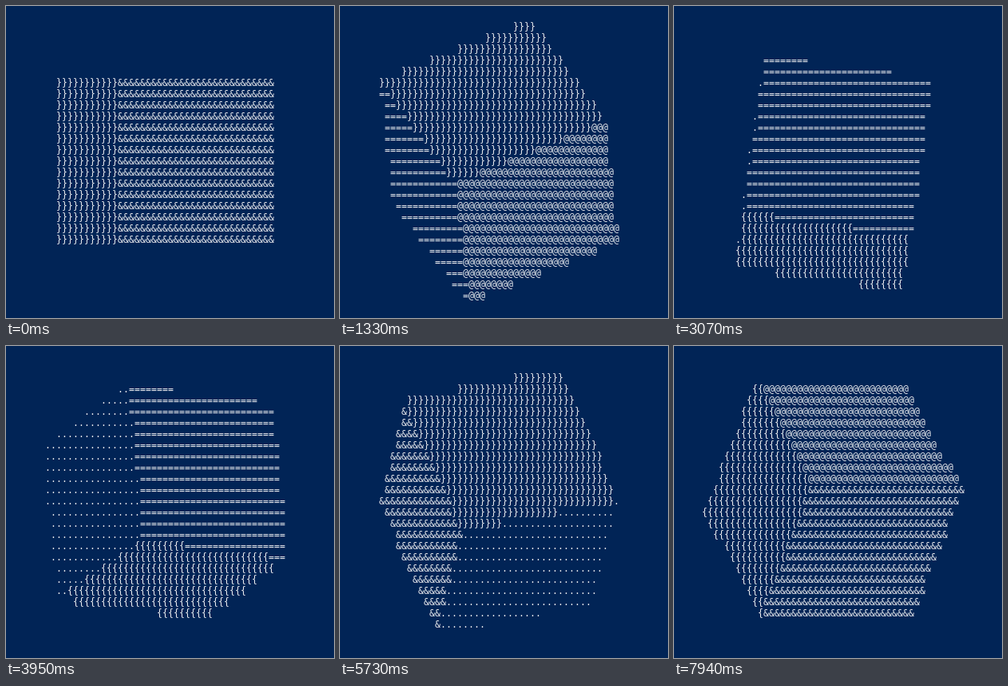
Recreate the animation shown at these times as an HTML page with a canvas. Size 411x390 px, loop 8000 ms.

```html
<!DOCTYPE html>
<html lang="en">
<head>
<meta charset="utf-8">
<title>Text cube</title>
<style>
  html, body { margin: 0; width: 100%; height: 100%; overflow: hidden; background: #012456; }
  canvas { display: block; }
</style>
</head>
<body>
<canvas id="stage" width="411" height="390"></canvas>
<script>
const LOOP = 8000, COLS = 57, ROWS = 27, CELL_W = 7, CELL_H = 14, TOP = 6;
const CENTER_X = 199.5, CENTER_Y = 195, HALF = 106;
const GLYPHS = ['}{', '&=', '@.'];   // front and back face of each cube axis

// Bursts of steps: first change, last change, number of changes.
const BURSTS = [
  [100, 840, 17], [940, 1670, 17], [1770, 2570, 13], [2670, 3470, 9], [3570, 4360, 16],
  [4380, 5120, 14], [5220, 6010, 15], [6030, 6830, 17], [6930, 7700, 15], [7800, 7940, 4]
];
const SHORT = 20;

// Orientations passed on the way: time, then the screen x and y parts of the cube axes.
const KEYS = [
  [0, [-.93, .367, 0], [0, 0, 1]],
  [820, [-.438, .884, .175], [-.363, -.363, .846]],
  [2190, [.219, .39, .893], [-.974, .065, .2]],
  [3070, [.124, -.06, .99], [-.938, .32, .145]],
  [4760, [-.205, -.955, .214], [-.968, .16, -.21]],
  [6530, [.722, -.545, -.43], [-.09, .55, -.825]],
  [7940, [.895, .338, .305], [.035, .6, -.795]]
];

const dot = (a, b) => a[0] * b[0] + a[1] * b[1] + a[2] * b[2];
const scale = (a, s) => a.map(v => v * s);
const unit = a => scale(a, 1 / Math.hypot(...a));
const cross = (a, b) => [a[1] * b[2] - a[2] * b[1], a[2] * b[0] - a[0] * b[2], a[0] * b[1] - a[1] * b[0]];
const transpose = m => m[0].map((_, c) => m.map(row => row[c]));
const multiply = (a, b) => a.map(row => transpose(b).map(col => dot(row, col)));

function orientation(x, y) {
  x = unit(x);
  y = unit(y.map((v, i) => v - dot(x, y) * x[i]));
  return [x, y, cross(x, y)];
}

// Rotation matrix of a rotation vector, and back.
function rotation(vector) {
  const angle = Math.hypot(...vector);
  if (angle < 1e-9) return [[1, 0, 0], [0, 1, 0], [0, 0, 1]];
  const axis = scale(vector, 1 / angle), c = Math.cos(angle), s = Math.sin(angle);
  return transpose([[1, 0, 0], [0, 1, 0], [0, 0, 1]].map(e => {
    const side = cross(axis, e), along = dot(axis, e) * (1 - c);
    return e.map((v, i) => v * c + side[i] * s + axis[i] * along);
  }));
}
function rotationVector(m) {
  const v = [m[2][1] - m[1][2], m[0][2] - m[2][0], m[1][0] - m[0][1]];
  const length = Math.hypot(...v);
  return length < 1e-9 ? [0, 0, 0]
    : scale(v, Math.atan2(length, m[0][0] + m[1][1] + m[2][2] - 1) / length);
}

// Long holds are spread evenly among the short steps of a burst.
const changes = BURSTS.flatMap(([start, end, count]) => {
  const gaps = count - 1;
  const holds = Math.round((end - start - SHORT * gaps) / 80);
  const hold = (end - start - SHORT * (gaps - holds)) / holds;
  return Array.from({ length: count }, (_, i) => {
    const passed = Math.round(i * holds / gaps);
    return start + passed * hold + (i - passed) * SHORT;
  });
});
const stepAt = time => changes.filter(t => t <= time + .01).length;

// Steady turn about the vertical with a swaying tilt, eased onto each key orientation.
const spin = n => rotation([.045 * Math.sin((n + 10) * .047), .0475, 0]);
const poses = [];
for (let k = 0; k + 1 < KEYS.length; k++) {
  const [t0, x0, y0] = KEYS[k], [t1, x1, y1] = KEYS[k + 1];
  const first = stepAt(t0), last = stepAt(t1);
  const path = [orientation(x0, y0)];
  for (let n = first; n < last; n++) path.push(multiply(spin(n), path[n - first]));
  const drift = rotationVector(multiply(orientation(x1, y1), transpose(path[last - first])));
  path.forEach((m, i) => {
    poses[first + i] = multiply(rotation(scale(drift, i / (last - first))), m);
  });
}

// Nearest cube face under a screen point, seen without perspective.
function glyphAt(axes, x, y) {
  let front = Infinity, back = -Infinity, glyph = ' ';
  axes.forEach(([ax, ay, az], i) => {
    const side = az < 0 ? -1 : 1, depth = Math.abs(az);
    const offset = side * (ax * x + ay * y);
    const near = (HALF - offset) / depth;
    if (near < front) {
      front = near;
      glyph = GLYPHS[i][side < 0 ? 1 : 0];
    }
    back = Math.max(back, (-HALF - offset) / depth);
  });
  return front >= back ? glyph : ' ';
}

const ctx = document.getElementById('stage').getContext('2d');

function draw(time) {
  const axes = transpose(poses[stepAt(time)]);
  const [slowStart, slowEnd] = BURSTS[3];
  const shift = time >= slowStart && time < slowEnd + 100 ? CELL_H : 0;
  ctx.fillStyle = '#012456';
  ctx.fillRect(0, 0, 411, 390);
  ctx.fillStyle = '#eeedf0';
  ctx.font = '11.5px "DejaVu Sans Mono", monospace';
  for (let row = 0; row < ROWS; row++) {
    const y = TOP + row * CELL_H;
    for (let col = 0; col < COLS; col++) {
      const x = col * CELL_W;
      const glyph = glyphAt(axes, x + CELL_W / 2 - CENTER_X, y + CELL_H / 2 - CENTER_Y - shift);
      if (glyph !== ' ') ctx.fillText(glyph, x, y + 10);
    }
  }
}

const begin = performance.now();
function tick() {
  draw((performance.now() - begin) % LOOP);
  requestAnimationFrame(tick);
}
tick();
</script>
</body>
</html>
```
